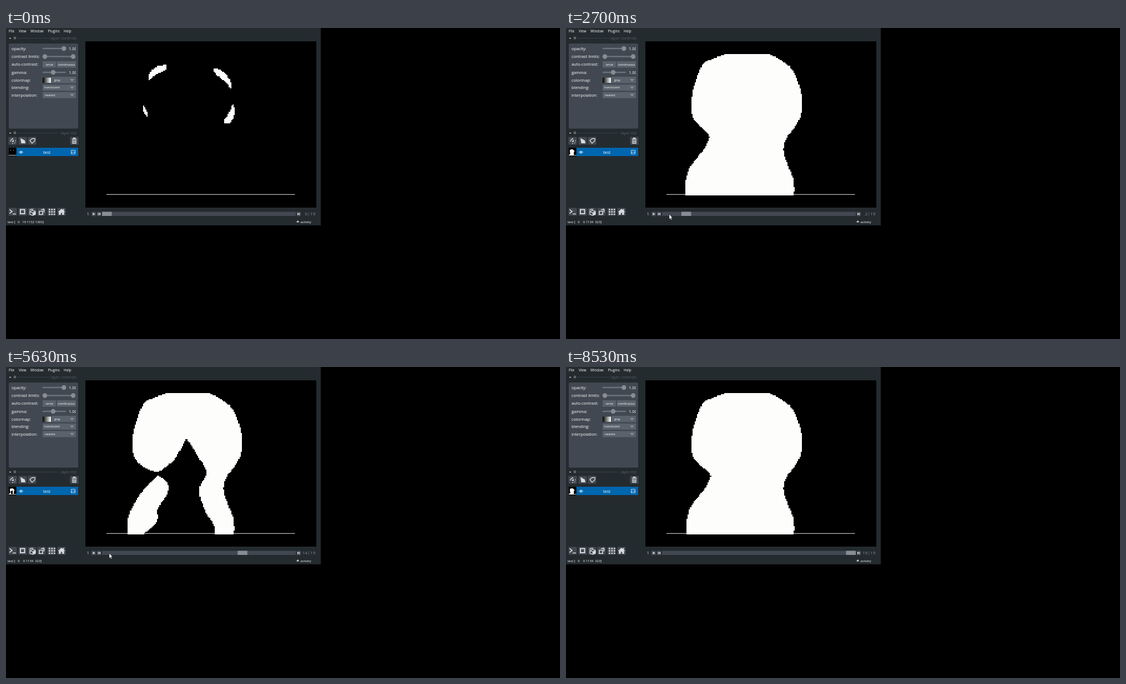
These frames come from a looping animation (998 px wide and 561 px high, 8560 ms). An HTML page:

```html
<!DOCTYPE html>
<html>
<head>
<meta charset="utf-8">
<style>
  html, body { margin: 0; width: 100%; height: 100%; overflow: hidden; background: #000; }
  svg { display: block; width: 998px; height: 561px; }
  text { font: 7.4px "Open Sans", "Noto Sans", sans-serif; fill: #fff; white-space: pre; }
  .menu text { font-size: 6.3px; }
  .small text { font-size: 5.9px; }
  .tiny text { font-size: 5.3px; }
  .dim text { fill: #565d66; text-anchor: end; }
  .count text { font-size: 8px; fill: #858c94; text-anchor: end; }
  .knob { fill: #868e93; }
  .box { fill: #414851; }
  .field { fill: #5a626c; }
  .icon { fill: none; stroke: #d8dadc; stroke-width: 1.3; }
  .solid { fill: #d8dadc; stroke: none; }
</style>
</head>
<body>
<svg viewBox="0 0 998 561">
  <defs>
    <linearGradient id="gray"><stop stop-color="#000"/><stop offset="1" stop-color="#fff"/></linearGradient>
    <clipPath id="panel"><path d="M5 28H126V182H5z"/></clipPath>
  </defs>
  <path fill="#242b2f" d="M0 0H567V356H0z"/>
  <path d="M143 24H559V324H143z"/>

  <g class="menu">
    <text x="5" y="8.2">File</text><text x="23" y="8.2">View</text><text x="44" y="8.2">Window</text>
    <text x="75.5" y="8.2">Plugins</text><text x="104" y="8.2">Help</text>
  </g>

  <g class="dim">
    <text x="127" y="21">layer controls</text><text x="127" y="192">layer list</text>
    <path d="M22 18.5H78M22 189.5H94" stroke="#464d55" stroke-dasharray="1.5 1"/>
    <path d="M6 18.5h3M6 189.5h3" stroke="#c5c8cc" stroke-width="1.5"/>
    <path d="M14.5 16.5h3v3h-3zM14.5 187.5h3v3h-3z" fill="none" stroke="#9a9fa5" stroke-width=".9"/>
  </g>

  <rect class="box" x="5" y="28" width="125" height="153.5" rx="2"/>
  <g clip-path="url(#panel)">
    <text x="10" y="40">opacity:</text><text x="10" y="54">contrast limits:</text>
    <text x="10" y="68">auto-contrast:</text><text x="10" y="82.5">gamma:</text>
    <text x="10" y="96.7">colormap:</text><text x="10" y="110">blending:</text>
    <text x="10" y="124">interpolation:</text>
    <text x="113" y="40">1.00</text><text x="113" y="83">1.00</text>
  </g>
  <path d="M66 37H104M66 51.5H124M66 80H108" stroke="#6a727b" stroke-width="2.4"/>
  <g class="knob">
    <circle cx="104.3" cy="37" r="4.2"/><circle cx="70" cy="51.5" r="4.2"/>
    <circle cx="121" cy="51.5" r="4.2"/><circle cx="85" cy="80" r="4.2"/>
  </g>
  <path class="field" d="M66 60H90V71.5H66zM91.5 60H126V71.5H91.5zM82 88H126V99.5H82zM66 102H126V113H66zM66 115.5H126V126.5H66z"/>
  <path fill="url(#gray)" d="M66 89.5H81V99H66z"/>
  <path class="knob" d="M115 92h8l-4 4.5zM115 105.5h8l-4 4.5zM115 119h8l-4 4.5z"/>
  <g class="small"><text x="71.5" y="67.8">once</text><text x="93.5" y="67.8">continuous</text></g>
  <g class="tiny">
    <text x="87" y="95.6">gray</text><text x="69" y="109.2">translucent</text><text x="70" y="122.6">nearest</text>
  </g>

  <g id="buttons" class="box"></g>
  <g class="icon">
    <path stroke-width="2" stroke-dasharray="2 2.5" d="M7.5 203.5h10M12 199v10M9 200.5l7 7"/>
    <path class="solid" d="M26 198.5l8 4.5 1 5h-7.5z"/>
    <path d="M43 203l4-3.5h5v4l-5 4.5z"/>
    <path d="M119 200.5h8M121.5 200v-1.5h3v1.5M120 202v6h6v-6M122 202.5v4M124 202.5v4"/>
    <path stroke-width="1.6" d="M6.5 327.5l4.5 3.5-4.5 3.5M12 335.5h6"/>
    <path stroke-width="2" d="M26 327.5h7.5v7.5h-7.5z"/>
    <path d="M42 329l3-2h4M43 331l5-2 5 2v5l-5 2-5-2zM43 331l5 2.5 5-2.5"/>
    <path class="solid" d="M48 333.5l5-2.5v5l-5 2z"/>
    <path stroke-width="1.7" d="M60 330.5h6v6h-6zM63 327.5h5.5v5M67 326l2 2"/>
    <path stroke-width="2.7" stroke-dasharray="2.7 1.7" d="M77 327.5h12M77 331.7h12M77 336h12"/>
    <path class="solid" d="M93.5 332l6.5-6 2.5 2.3v-1.8h2v3.5l2 2h-1.8v5h-3.5v-3.5h-2.5v3.5h-3.5v-5z"/>
  </g>

  <path fill="#0066ae" d="M19 216H130V231H19z"/>
  <path d="M5 216H18.5V231H5z"/>
  <path fill="#fff" d="M5 229H18.5v.8H5z"/>
  <use href="#mask" transform="translate(-2.5 217.2) scale(.041)"/>
  <path fill="none" stroke="#d9e8f5" d="M23.5 224q3.500-4 7 0q-3.500 4-7 0z"/>
  <circle cx="27" cy="224" r="1.3" fill="#d9e8f5"/>
  <text x="67" y="226.8">test</text>
  <path fill="none" stroke="#b8d8ef" d="M117.5 220.5h7v6.5h-7zM118 226l2.5-3 1.5 1.5 1-1 1.5 2.5"/>

  <path id="mask" fill="#fdfdfc" shape-rendering="crispEdges"/>
  <path fill="#e8eaf0" d="M181 299.800H520.5v1H181z"/>

  <path class="box" d="M173 331.5H522V339H173zM154 331.5h8v8h-8zM164 331.5h7.5v8h-7.5zM523.5 331.5h7.5v8h-7.5z"/>
  <path class="solid" d="M156.5 333l4 2.5-4 2.5zM170 333.2v4.6l-3.2-2.3zM165.7 333.2h1v4.6h-1zM525 333.2v4.6l3.2-2.3zM528.3 333.2h1v4.6h-1z"/>
  <rect id="handle" class="knob" y="331.5" width="17.5" height="7.5"/>
  <g class="menu"><text x="146" y="337.7">1</text></g>
  <g class="count"><text id="index" x="543" y="338.3"></text><text x="557.5" y="338.3">19</text></g>
  <path d="M545.5 332v7.5" stroke="#5a616a" stroke-width=".8"/>
  <g class="small">
    <text id="status" x="3" y="351.5"></text><text x="530.5" y="351.5">activity</text>
  </g>
  <path class="solid" d="M523 350.5l2.7-3.5 2.7 3.5z"/>
  <path id="cursor" fill="#fff" stroke="#222" stroke-width=".5" d="M186 336v9l2-1.8 1.5 3 1.3-.7-1.5-2.9h2.6z"/>
</svg>
<script>
const $ = id => document.getElementById(id);
const CELL = 2.12, LEFT = 181, TOP = 47.2, FLOOR = 300;
const pen = document.createElement("canvas").getContext("2d");

// Smooth curve through the points, without its leading command.
function smooth(pts) {
  const at = i => pts[Math.max(0, Math.min(i, pts.length - 1))];
  const handle = (i, k) => [0, 1].map(c => at(i)[c] + k * (at(i + 1)[c] - at(i - 1)[c]) / 6);
  return pts[0] + pts.slice(1).map((p, i) => `C${handle(i, 1)} ${handle(i + 1, -1)} ${p}`).join("");
}
const outline = (...curves) => "M" + curves.map(smooth).join("L") + "z";
const shift = (pts, dx) => pts.map(([x, y]) => [x + dx, y]);

const rightSide = [[364,47], [382,55], [405,72], [418,97], [424.5,125], [424.5,150], [416,173],
  [397,200], [392,222], [401,250], [410,275], [411,301]];
const leftLeg = [[215,301], [215,281], [223,252], [246,222], [257,203], [257,192]];
const head = bulge => [[243,178], [229,162], [225 + bulge,140], [228,115], [234,95], [245,68], [258,58], [289,47]];

const arcs = "M257 93Q256 68 289 67V75Q272 82 259 93z M373 73H381Q407 85 405.5 110Q398 99 386 90Q376 84 373 73z"
  + "M246 141H249L256 154V159H253Q246 152 246 141z M407 139H410Q416 160 401 173H393V165Q402 157 407 139z";

const arch = outline(rightSide,
    [[376,301], [374,284], [359,260], [348,222], [361,190], [347,163], [325,128]],
    [[325,128], [306,163], [288,180], [270,189], ...shift(head(0), 2)])
  + outline([[274,195], [291,210], [291,228], [274,255], [272,278], [249,301]],
    [[220,301], [220,272], [238,235], [262,206], [274,195]]);

function shape(n) {
  if (n === 0) return arcs;
  if (n === 14) return arch;
  const sway = -2 * Math.max(0, 1 - Math.abs(n - 9) / 7);
  const leg = shift(leftLeg, sway + (n > 9 ? 2 : 0));
  return outline(shift(rightSide, sway), [...leg, ...shift(head(sway), sway)]);
}

// Turns an outline into whole cells, one run at a time along each row.
function pixelate(d) {
  const path = new Path2D(d);
  let cells = "";
  for (let y = TOP; y < FLOOR; y += CELL)
    for (let x = LEFT, from = null; x < 440; x += CELL) {
      const inside = pen.isPointInPath(path, x + CELL / 2, y + CELL / 2);
      if (inside && from === null) from = x;
      if (!inside && from !== null) {
        cells += `M${from} ${y}H${x}v${CELL}H${from}z`;
        from = null;
      }
    }
  return cells;
}

const slices = Array.from({ length: 20 }, (_, n) => pixelate(shape(n)));

for (const [y, columns] of [[203.5, [12, 30, 47, 123]], [331.5, [12, 30, 47, 64, 82, 100]]])
  for (const x of columns)
    $("buttons").innerHTML += `<rect x="${x - 7.5}" y="${y - 7}" width="15" height="14" rx="1"/>`;

// Steady scrolling that quickens towards the last slice.
function sliceAt(t) {
  const n = t < 5550 ? (t - 2040) / 242 : 14.5 + (t - 5550) / 189;
  return Math.max(0, Math.min(19, Math.floor(n)));
}

const start = performance.now();
function draw() {
  const t = (performance.now() - start) % 8560;
  const n = sliceAt(t);
  $("mask").setAttribute("d", slices[n]);
  $("handle").setAttribute("x", 173 + n * 17.45);
  $("index").textContent = n;
  $("status").textContent = t < 450 ? "test [   0   19 1132 1365]" : "test [   0    0 1134  323]";
  $("cursor").style.display = t > 1650 && t < 7500 ? "" : "none";
  requestAnimationFrame(draw);
}
draw();
</script>
</body>
</html>
```
